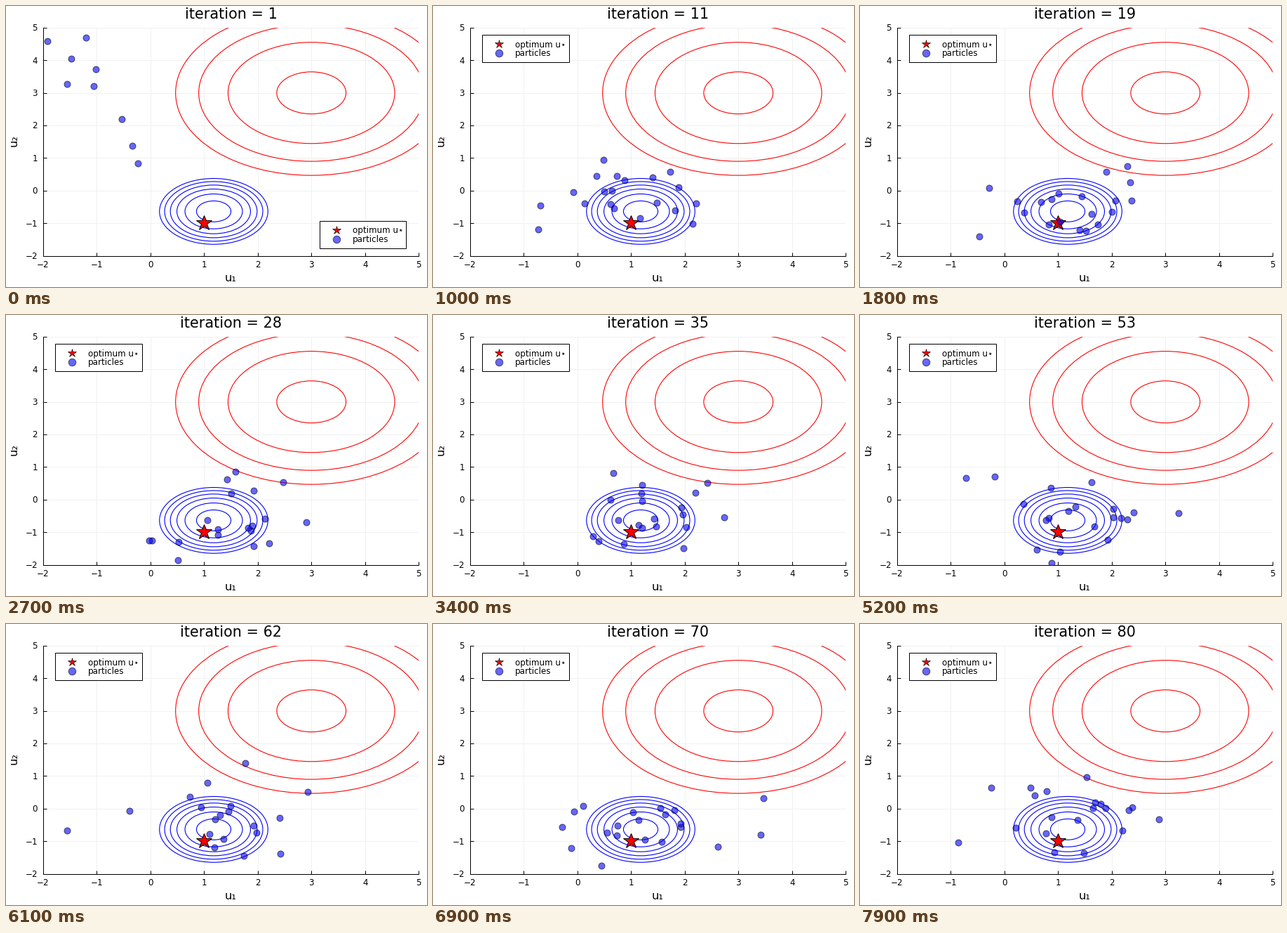
A matplotlib script for the animation above (8000 ms loop, 600 by 400 pixels).

```python
import numpy as np
import matplotlib.pyplot as plt
from matplotlib.animation import FuncAnimation
from matplotlib.patches import Circle, Rectangle

plt.rcParams["font.family"] = "DejaVu Sans"

W, H, DPI = 600, 400, 100
FRAMES, COUNT = 80, 20
LEFT, RIGHT, TOP, BOTTOM = 52.8, 588.2, 30.9, 355.7
LEGEND_JUMP = 4
PT = 72 / DPI  # points per pixel

# Particles in view at the start; the rest wait above the axes
START = [(-1.92, 4.58), (-1.2, 4.7), (-1.47, 4.06), (-1.02, 3.73), (-1.55, 3.27),
         (-1.05, 3.21), (-.53, 2.2), (-.34, 1.38), (-.23, .83)]


def swarm_paths(rho=0.75):
    """Mean-reverting random walk that forgets its start exponentially."""
    rng = np.random.default_rng(7)
    mean, spread = np.array([1.2, -0.35]), np.array([0.9, 0.68])
    hidden = np.linspace((-1.7, 5.4), (-3.4, 8.5), COUNT - len(START))
    paths = np.empty((FRAMES, COUNT, 2))
    paths[0] = np.vstack([START, hidden])
    for i in range(1, FRAMES):
        kick = spread * rng.normal(size=(COUNT, 2))
        paths[i] = mean + rho * (paths[i - 1] - mean) + np.sqrt(1 - rho**2) * kick
    return paths


paths = swarm_paths()

fig = plt.figure(figsize=(W / DPI, H / DPI), dpi=DPI, facecolor="white")
ax = fig.add_axes([LEFT / W, 1 - BOTTOM / H, (RIGHT - LEFT) / W, (BOTTOM - TOP) / H])
ax.set(xlim=(-2, 5), ylim=(-2, 5))
ax.set_axisbelow(True)
ax.grid(color="#f1f1f1", lw=PT)
ax.tick_params(direction="in", length=5 * PT, width=PT, labelbottom=False, labelleft=False)
ax.spines[["top", "right"]].set_visible(False)
ax.spines[["left", "bottom"]].set_linewidth(PT)

# Overlay in pixel coordinates, y pointing down
page = fig.add_axes([0, 0, 1, 1])
page.set(xlim=(0, W), ylim=(H, 0))
page.axis("off")


def label(x, y, s, px, ha="center", **kw):
    return page.text(x, y, s, fontsize=px * PT, ha=ha, va="baseline", **kw)


def star(axes, x, y, px, edge=1):
    return axes.plot(x, y, "*", ms=px * PT, mfc="red", mec="black", mew=edge * PT,
                     zorder=4)[0]


def dots(axes, x, y, px):
    return axes.plot(x, y, "o", ms=px * PT, mfc=(0, 0, 1, 0.6), mec=(0, 0, 0, 0.6),
                     mew=PT, zorder=5)[0]


def contours(center, first, step, n, color):
    for k in range(n):
        ax.add_patch(Circle(center, np.sqrt(first + step * k), fill=False,
                            ec=color, lw=1.1 * PT, zorder=3))


def legend(x, y):
    box = page.add_patch(Rectangle((x, y), 123.5, 39, fc="white", ec="black", lw=PT))
    return [box, star(page, x + 24, y + 13, 13, 0.6), dots(page, x + 24, y + 26, 10.5),
            label(x + 47, y + 17.5, "optimum u⋆", 11.9, "left"),
            label(x + 47, y + 30.5, "particles", 11.9, "left")]


contours((3, 3), 0.416, 1.995, 4, "red")
contours((1.18, -0.635), 0.103, 0.1835, 6, "blue")
star(ax, 1, -1, 23)
swarm = dots(ax, [], [], 9)

for v in range(-2, 6):
    name = str(v).replace("-", "−")
    label(LEFT + (v + 2) * (RIGHT - LEFT) / 7, 371.5, name, 11.9)
    label(45, BOTTOM - (v + 2) * (BOTTOM - TOP) / 7 + 4.3, name, 11.9, "right")
label(320.5, 392, "u₁", 16.3)
label(16, 192, "u₂", 16.3, rotation=90, rotation_mode="anchor")
title = label(320.5, 18, "", 20.8)

low_legend = legend(446.5, 305.5)
high_legend = legend(70, 41)


def draw(i):
    title.set_text(f"iteration = {i + 1}")
    swarm.set_data(paths[i, :, 0], paths[i, :, 1])
    for part in low_legend:
        part.set_visible(i < LEGEND_JUMP)
    for part in high_legend:
        part.set_visible(i >= LEGEND_JUMP)
    return [title, swarm, *low_legend, *high_legend]


anim = FuncAnimation(fig, draw, frames=FRAMES, interval=100, repeat=True,
                     repeat_delay=0, blit=False)
plt.show()
```
